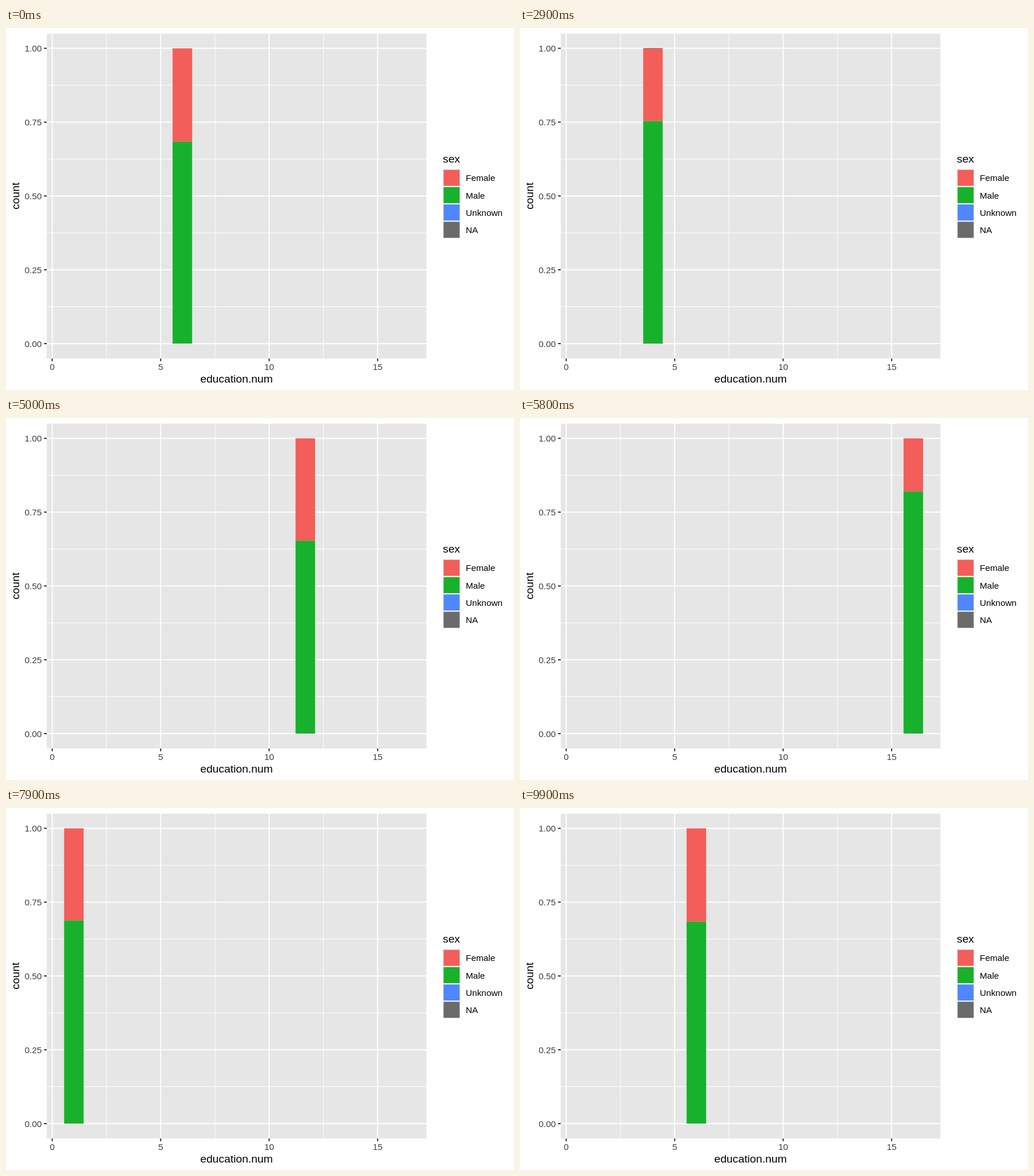
An HTML page for the animation above (10 s loop, 885 by 632 pixels).

```html
<!DOCTYPE html>
<html lang="en">
<head>
<meta charset="utf-8">
<title>Share by education</title>
<style>
html, body { margin: 0; width: 100%; height: 100%; overflow: hidden; background: #fff; }
svg { display: block; width: 885px; height: 632px; font: 15.4px "Liberation Sans", Arial, sans-serif; }
.title { font-size: 19.25px; }
.tick { fill: #3e3e3e; }
</style>
</head>
<body>
<svg id="chart" viewBox="0 0 885 632"></svg>
<script>
const RED = '#f35e5a', GREEN = '#18b12b', BLUE = '#5086ff', GREY = '#6b6b6b';
const LOOP = 10000, FRAME = 100, HALF_BAR = 17.01;
const chart = document.getElementById('chart');
const px = v => 80.45 + v * 37.8;
const py = v => 551 - v * 515.5;
const mix = (a, b, f) => a + (b - a) * f;

function add(parent, tag, attrs, text = '') {
  const el = document.createElementNS('http://www.w3.org/2000/svg', tag);
  for (const key in attrs) el.setAttribute(key, attrs[key]);
  el.textContent = text;
  return parent.appendChild(el);
}
const rect = (parent, x, y, width, height, fill) =>
  add(parent, 'rect', { x, y, width, height, fill });
const label = (text, x, y, anchor = 'start', cls = '') =>
  add(chart, 'text', { x, y, 'text-anchor': anchor, class: cls }, text);
const vLine = (x, w) => rect(chart, x - w / 2, 10, w, 567, '#fff');
const hLine = (y, w) => rect(chart, 71, y - w / 2, 661.3, w, '#fff');

// Panel, minor grid, then major grid with ticks
rect(chart, 71, 10, 661.3, 567, '#e6e6e6');
for (let v = 2.5; v < 15; v += 5) vLine(px(v), 0.95);
for (let v = 0.125; v < 1; v += 0.25) hLine(py(v), 0.95);
for (let v = 0; v <= 15; v += 5) {
  vLine(px(v), 1.9);
  rect(chart, px(v) - 0.95, 577, 1.9, 4.8, '#272727');
  label(v, px(v), 596.5, 'middle', 'tick');
}
for (let v = 0; v <= 1; v += 0.25) {
  hLine(py(v), 1.9);
  rect(chart, 66.2, py(v) - 0.95, 4.8, 1.9, '#272727');
  label(v.toFixed(2), 62.4, py(v) + 5.5, 'end', 'tick');
}
label('education.num', 401.6, 619, 'middle', 'title');
label('count', 0, 0, 'middle', 'title').setAttribute('transform', 'translate(23 293.3) rotate(-90)');

// Legend
label('sex', 761, 235, 'start', 'title');
[['Female', RED], ['Male', GREEN], ['Unknown', BLUE], ['NA', GREY]].forEach(([name, color], i) => {
  const y = 246.5 + i * 30.24;
  rect(chart, 761.2, y, 30.24, 30.24, '#f0f0f0');
  rect(chart, 762.3, y + 1.1, 28, 28, color);
  label(name, 801, y + 20.9);
});

// Male share by education number, linear between key points
const keys = [[1, .688], [4, .7535], [6, .684], [9, .677], [12, .61], [13, .695], [14, .69], [16, .82]];
function male(x) {
  const i = Math.max(1, keys.findIndex(k => k[0] >= x));
  const [x0, s0] = keys[i - 1], [x1, s1] = keys[i];
  return mix(s0, s1, (x - x0) / (x1 - x0));
}

// Levels take numbers 1 to 16 in school order and are shown in alphabetical order.
const levels = ('Preschool 1st-4th 5th-6th 7th-8th 9th 10th 11th 12th HS-grad Some-college ' +
  'Assoc-voc Assoc-acdm Bachelors Masters Prof-school Doctorate').split(' ');
const span = (a, b) => Array.from({ length: b - a + 1 }, (_, i) => a + i);
const groups = { Missing: span(4, 15), Unknown: span(6, 14) };
levels.forEach((name, i) => groups[name] = [i + 1]);
const states = Object.keys(groups).sort()
  .map(name => groups[name].map(x => ({ x, share: male(x) })));

// Moves begin every six frames; the later ones are a frame shorter.
const moveSteps = i => i < 11 ? 3 : 2;
const moveStart = i => FRAME * (3 + 6 * i - (i > 7) - Math.max(0, i - 11));

// Paired bars slide; the others appear or vanish when the move ends.
function barsAt(t) {
  let i = states.length - 1;
  while (i >= 0 && moveStart(i) > t) i--;
  if (i < 0) return states[0];
  const from = states[i], to = states[(i + 1) % states.length];
  const f = (Math.floor((t - moveStart(i)) / FRAME) + 1) / moveSteps(i);
  if (f >= 1) return to;
  return from.map((a, k) => to[k]
    ? { x: mix(a.x, to[k].x, f), share: mix(a.share, to[k].share, f) }
    : a);
}

const layer = add(chart, 'g', {});
const rimmed = [4, 14];

function drawBar({ x, share }) {
  const left = px(x) - HALF_BAR, width = 2 * HALF_BAR, split = py(share);
  rect(layer, left, py(1), width, split - py(1), RED);
  rect(layer, left, split, width, py(0) - split, GREEN);
  if (rimmed.includes(x)) {
    rect(layer, left, py(1) - 0.3, width, 0.8, GREY);
    rect(layer, left, py(0) - 0.6, width, 0.6, GREY);
  }
}

function draw(now) {
  layer.replaceChildren();
  barsAt(now % LOOP).forEach(drawBar);
  requestAnimationFrame(draw);
}
draw(performance.now());
</script>
</body>
</html>
```
